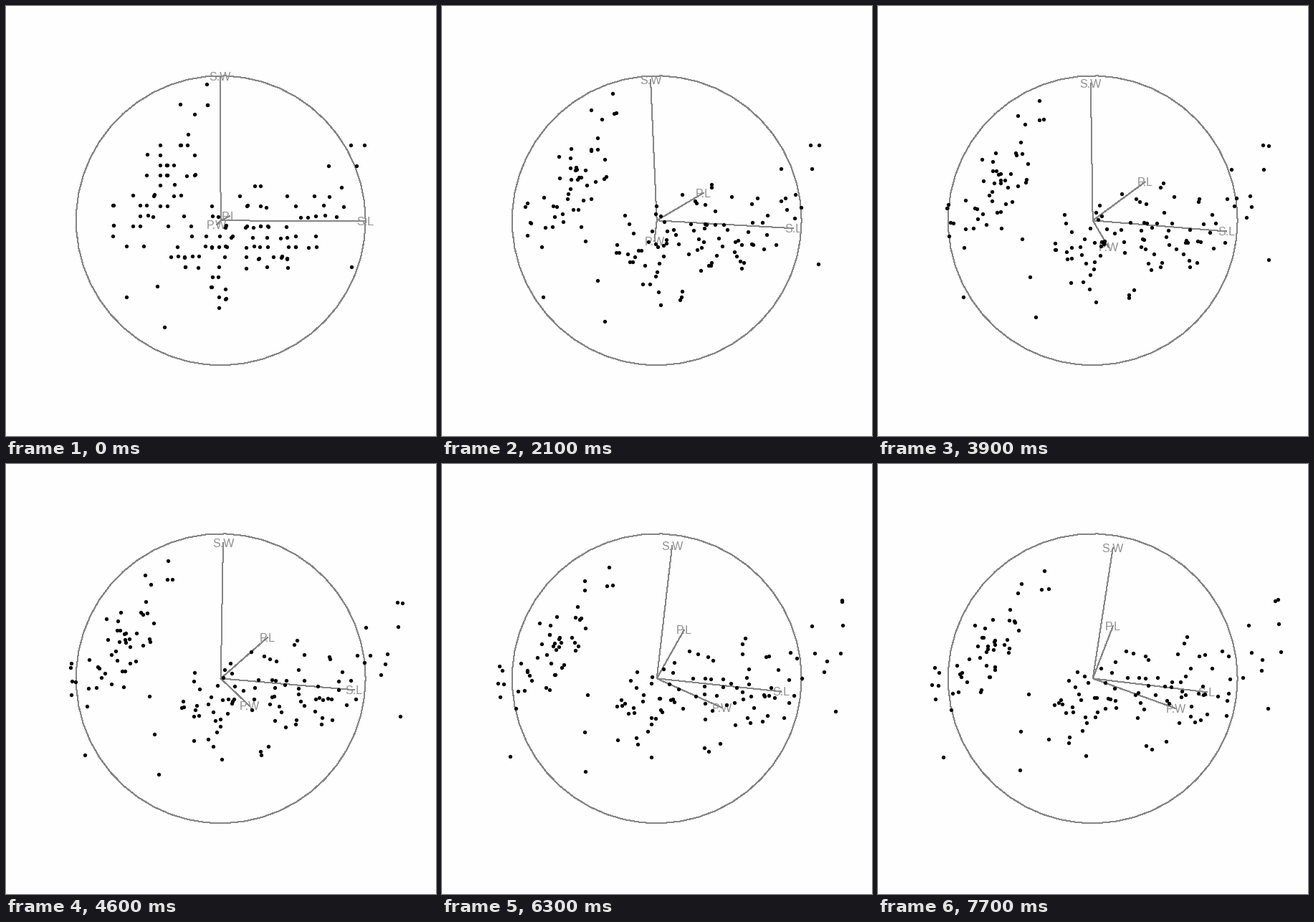
Animation of 600 by 600 pixels, one loop 8 s. Source, as a matplotlib script:

```python
import numpy as np
import matplotlib.pyplot as plt
from matplotlib.animation import FuncAnimation

SIZE, DPI = 600, 100
FRAMES, INTERVAL = 80, 100
BEAT = 200  # ms between visible steps of the tour
CENTER = np.array([299.7, 299.3])
RADIUS, SPREAD = 202, 341
PX = 72 / DPI  # one pixel in points

LABELS = ["S.L", "S.W", "P.L", "P.W"]

rng = np.random.default_rng(12)


def cluster(count, mean, shared, own):
    """Flowers whose four sizes vary together (shared) and apart (own)."""
    noise = rng.standard_normal((count, 5)).clip(-1.9, 1.9)
    sizes = mean + noise[:, :1] * shared + noise[:, 1:] * own
    return sizes.round(1).clip(0.1)


OUTLIERS = [(5.7, 4.4, 1.5, 0.4), (4.5, 2.3, 1.3, 0.3),
            (7.7, 3.8, 6.7, 2.2), (7.9, 3.8, 6.4, 2.0),
            (7.7, 2.6, 6.9, 2.3), (5.0, 2.0, 3.5, 1.0)]

flowers = np.vstack([
    cluster(48, np.array([5.0, 3.43, 1.46, 0.25]),
            np.array([0.30, 0.32, 0.05, 0.03]),
            np.array([0.18, 0.20, 0.16, 0.09])),
    cluster(49, np.array([5.94, 2.78, 4.26, 1.33]),
            np.array([0.40, 0.20, 0.42, 0.15]),
            np.array([0.32, 0.23, 0.20, 0.11])),
    cluster(47, np.array([6.53, 2.95, 5.5, 2.02]),
            np.array([0.55, 0.15, 0.48, 0.09]),
            np.array([0.25, 0.25, 0.22, 0.22])),
    OUTLIERS,
])
data = (flowers - [5.843, 3.057, 3.758, 1.199]) / [3.6, 2.4, 5.9, 2.4]

# Planes visited by the tour: horizontal and vertical direction in data space.
PLANES = np.array([
    [(0.998, -0.005, 0.060, -0.027), (-0.005, 0.998, 0.030, -0.030)],
    [(0.908, -0.055, 0.407, -0.012), (-0.070, 0.953, 0.243, -0.179)],
    [(0.821, 0.134, 0.139, 0.526), (-0.094, 0.908, 0.352, -0.206)],
    [(0.787, 0.139, 0.139, 0.576), (-0.094, 0.903, 0.362, -0.208)],
])


def slerp(a, b, t):
    """Turn direction a towards b at constant angular speed."""
    cosine = a @ b / np.linalg.norm(a) / np.linalg.norm(b)
    angle = np.arccos(np.clip(cosine, -1, 1))
    return (np.sin((1 - t) * angle) * a + np.sin(t * angle) * b) / np.sin(angle)


def projection(frame):
    """4 x 2 matrix from data space to the stage, y pointing down."""
    ms = (frame * INTERVAL + BEAT // 2) // BEAT * BEAT
    progress = np.interp(ms, [0, 1000, 3200, 7000, 7400, 7800],
                         [0, 0.45, 1, 2, 2.45, 3])
    leg = min(int(progress), len(PLANES) - 2)
    across, up = (slerp(a, b, progress - leg)
                  for a, b in zip(PLANES[leg], PLANES[leg + 1]))
    return np.column_stack([across, -up])


fig = plt.figure(figsize=(SIZE / DPI, SIZE / DPI), dpi=DPI, facecolor="#fefefe")
ax = fig.add_axes([0, 0, 1, 1])
ax.set(xlim=(0, SIZE), ylim=(SIZE, 0))
ax.axis("off")

line_style = dict(color="#858585", lw=PX, antialiased=False)
theta = np.linspace(0, 2 * np.pi, 50)
ax.plot(CENTER[0] + RADIUS * np.cos(theta), CENTER[1] - RADIUS * np.sin(theta),
        **line_style)
spokes = [ax.plot([], [], **line_style)[0] for _ in LABELS]
names = [ax.text(0, 0, label, family="Liberation Sans", size=16 * PX,
                 color="#919191", ha="center", va="baseline", zorder=3)
         for label in LABELS]
dots = ax.scatter(*np.zeros((2, len(data))), s=(5.3 * PX) ** 2, c="black",
                  linewidths=0, zorder=4)


def draw(frame):
    matrix = projection(frame)
    for spoke, name, tip in zip(spokes, names, CENTER + RADIUS * matrix):
        spoke.set_data(*np.array([CENTER, tip]).T)
        name.set_position((tip[0], tip[1] + 5.8))
    dots.set_offsets(CENTER + SPREAD * data @ matrix)
    return [*spokes, *names, dots]


anim = FuncAnimation(fig, draw, frames=FRAMES, interval=INTERVAL,
                     repeat=True, repeat_delay=0)
plt.show()
```
